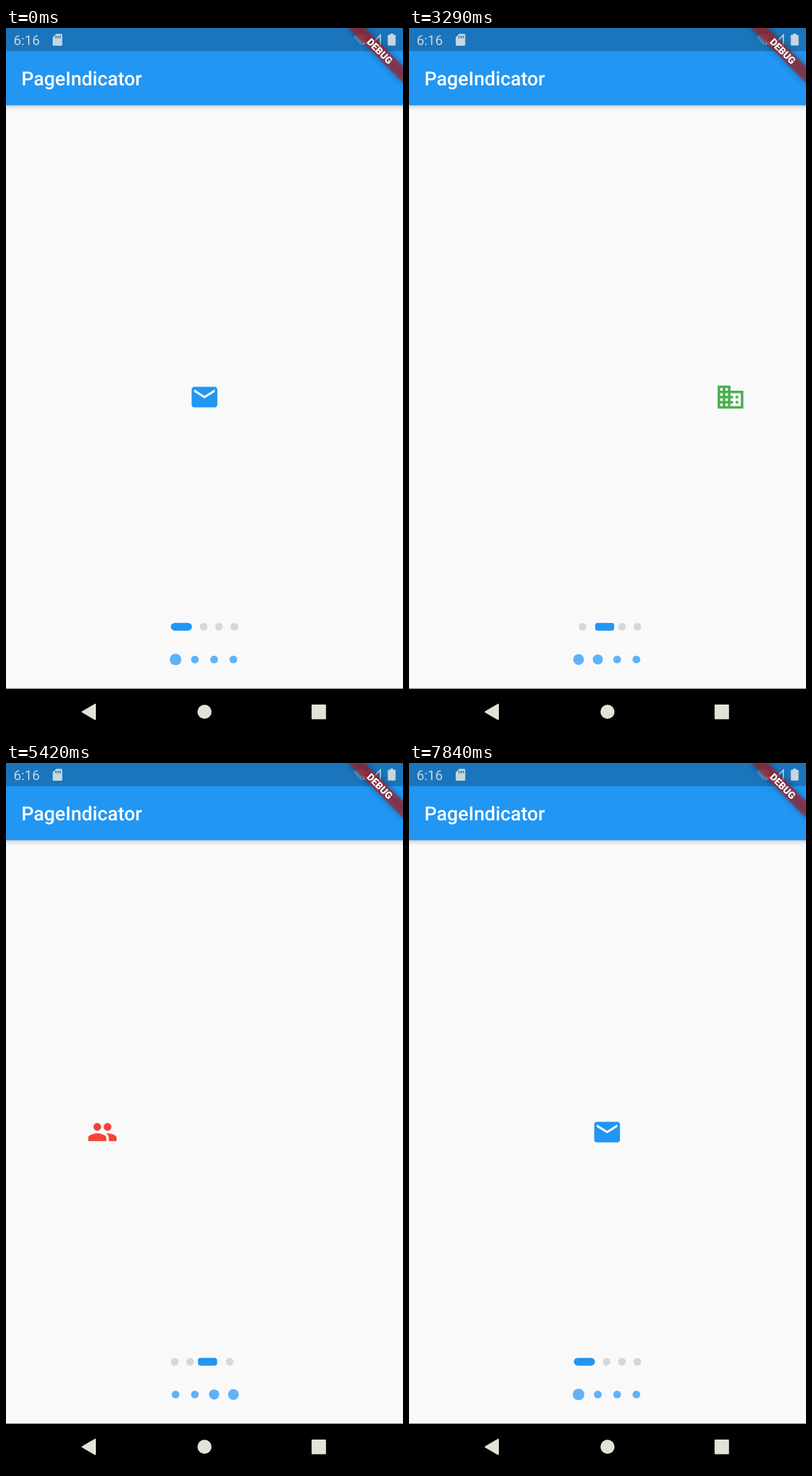
An HTML page for the animation above (7890 ms loop, 561 by 998 pixels).

```html
<!DOCTYPE html>
<html lang="en">
<head>
<meta charset="utf-8">
<title>PageIndicator</title>
<style>
  html, body { margin: 0; width: 100%; height: 100%; overflow: hidden; background: #f9f9fa; }
  svg { display: block; width: 100%; height: 100%; }
  text { font-family: Roboto, sans-serif; text-rendering: geometricPrecision; }
</style>
</head>
<body>
<svg viewBox="0 0 561 998">
  <defs>
    <linearGradient id="shade" x2="0" y2="1">
      <stop stop-color="#000" stop-opacity=".2"/>
      <stop offset=".35" stop-color="#000" stop-opacity=".08"/>
      <stop offset="1" stop-color="#000" stop-opacity="0"/>
    </linearGradient>
    <filter id="blur" x="-20%" y="-100%" width="140%" height="300%"><feGaussianBlur stdDeviation="5"/></filter>
  </defs>
  <rect width="561" height="998" fill="#f9f9fa"/>

  <g id="pages">
    <path fill="#2196f3" d="M20 4H4c-1.1 0-2 .9-2 2v12c0 1.1.9 2 2 2h16c1.1 0 2-.9 2-2V6c0-1.1-.9-2-2-2zm0 4l-8 5-8-5V6l8 5 8-5v2z"/>
    <path fill="#4caf50" d="M12 7V3H2v18h20V7H12zM6 19H4v-2h2v2zm0-4H4v-2h2v2zm0-4H4V9h2v2zm0-4H4V5h2v2zm4 12H8v-2h2v2zm0-4H8v-2h2v2zm0-4H8V9h2v2zm0-4H8V5h2v2zm10 12h-8v-2h2v-2h-2v-2h2v-2h-2V9h8v10zm-2-8h-2v2h2v-2zm0 4h-2v2h2v-2z"/>
    <path fill="#f44336" d="M16 11c1.66 0 3-1.34 3-3s-1.34-3-3-3-3 1.34-3 3 1.34 3 3 3zm-8 0c1.66 0 3-1.34 3-3S9.66 5 8 5 5 6.34 5 8s1.34 3 3 3zm0 2c-2.33 0-7 1.17-7 3.5V19h14v-2.5c0-2.33-4.67-3.5-7-3.5zm8 0c-.29 0-.62.02-.97.05 1.16.84 1.97 1.97 1.97 3.45V19h6v-2.5c0-2.33-4.67-3.5-7-3.5z"/>
    <path fill="#ffeb3b" d="M3.24 6.15C2.51 6.43 2 7.17 2 8v12c0 1.1.89 2 2 2h16c1.11 0 2-.9 2-2V8c0-1.11-.89-2-2-2H8.3l8.26-3.34L15.88 1 3.24 6.15zM7 20c-1.66 0-3-1.34-3-3s1.34-3 3-3 3 1.34 3 3-1.34 3-3 3zm13-8h-2v-2h-2v2H4V8h16v4z"/>
  </g>
  <g id="slots"></g>
  <g id="dots" fill="#60b2f7"></g>

  <!-- app bar -->
  <rect y="109" width="561" height="8" fill="url(#shade)"/>
  <rect width="561" height="109" fill="#2196f3"/>
  <rect width="561" height="32.7" fill="#1a75bc"/>
  <text x="21.8" y="81" font-size="27.27" font-weight="500" fill="#fff">PageIndicator</text>

  <!-- status bar -->
  <g fill="#c9d6dc">
    <text x="10.8" y="24" font-size="19.1">6:16</text>
    <path d="M71 8.2h7a1.5 1.5 0 0 1 1.5 1.5v13.8a1.5 1.5 0 0 1-1.5 1.5H67.5a1.5 1.5 0 0 1-1.5-1.5V13.2z"/>
    <path d="M70.6 11v3.5m3-3.5v3.5m3-3.5v3.5" stroke="#1a75bc" stroke-width="1.5"/>
    <path d="M491 12.5q10-8.5 20 0L501 24.5z" opacity=".3"/>
    <path d="M504 18.5l5 5m0-5l-5 5" stroke="#c9d6dc" stroke-width="1.5"/>
    <path d="M515.5 23.7H529V10z" fill="none" stroke="#c9d6dc" stroke-width="1.7"/>
    <path d="M542.7 8h4.6v1.7h2.2q1 0 1 1v13.1q0 1-1 1h-9q-1 0-1-1V10.7q0-1 1-1h2.2z"/>
  </g>

  <!-- debug banner -->
  <g transform="translate(561 0) rotate(45)">
    <rect x="-54.5" y="38.2" width="109" height="16.4" opacity=".35" filter="url(#blur)"/>
    <rect x="-54.5" y="38.2" width="109" height="16.4" fill="#b71c1c" fill-opacity=".63"/>
    <text y="51.3" font-size="13.9" font-weight="900" fill="#fff" text-anchor="middle">DEBUG</text>
  </g>

  <!-- navigation bar -->
  <rect y="932.6" width="561" height="65.4"/>
  <g fill="#e2e2d9" stroke="#e2e2d9" stroke-linejoin="round" stroke-width="2">
    <path d="M108 965.3L126 954.8V975.8z"/>
    <circle cx="280.5" cy="965.3" r="9"/>
    <rect x="432.8" y="956" width="18.4" height="18.8"/>
  </g>
</svg>
<script>
const LOOP = 7890, W = 561, DOT = 10.9, EXTRA = 19;
// Each swipe: moment it passes the halfway point (s), from, to, speed there (pages/s)
const swipes = [
  [3.206, 0, 1, 1.34], [3.87, 1, 2, 3], [4.535, 2, 3, 3],
  [5.33, 3, 2, 3], [6.104, 2, 1, 7.4], [7.13, 1, 0, 3]
];
const DRAG = 0.22, SWITCH = 0.3, SLOW = 9.07, FAST = 22;

const $ = id => document.getElementById(id);
const set = (el, attrs) => { for (const k in attrs) el.setAttribute(k, attrs[k]); };
const make = (tag, parent) => Array.from({ length: 4 }, () =>
  parent.appendChild(document.createElementNS('http://www.w3.org/2000/svg', tag)));

const icons = [...$('pages').children];
const slots = make('rect', $('slots'));
const dots = make('circle', $('dots'));

// Overdamped spring: distance left after t seconds, starting half a page away
function remaining(t, speed) {
  const a = (FAST * 0.5 - speed) / (FAST - SLOW);
  return a * Math.exp(-SLOW * t) + (0.5 - a) * Math.exp(-FAST * t);
}

function stateAt(t) {
  let pos = 0, prev = 0, cur = 0, s = 1;
  for (const [mid, from, to, speed] of swipes) {
    const dt = t - mid;
    if (dt < -DRAG) break;
    if (dt < 0) {
      const k = Math.max(1, 2 * speed * DRAG);
      pos += ((from + to) / 2 - pos) * (1 + dt / DRAG) ** k;
    } else {
      pos = to - (to - from) * remaining(dt, speed);
      prev = from;
      cur = to;
      s = Math.min(1, dt / SWITCH);
    }
  }
  return { pos, prev, cur, s };
}

function draw(now) {
  const { pos, prev, cur, s } = stateAt((now % LOOP) / 1000);
  const grow = 1 - (1 - s) ** 3, shrink = 1 - s * s * (3 - 2 * s);
  let x = 232.9;
  for (let i = 0; i < 4; i++) {
    const active = i === cur, old = i === prev && !active;
    set(icons[i], { transform: `translate(${W / 2 + (i - pos) * W} 521) scale(1.818) translate(-12 -12)` });

    const room = DOT + EXTRA * (active ? s : old ? 1 - s : 0);
    const w = active ? 21.8 + 8.1 * grow : DOT;
    set(slots[i], {
      x: x + (room - w) / 2, y: 845.2 - DOT / 2, width: w, height: DOT,
      rx: DOT / 2 * (active ? grow : 1), fill: active ? '#2196f3' : '#d7d7d9'
    });
    x += room + DOT;

    const big = active ? grow : old ? shrink : 0;
    set(dots[i], { cx: 239.6 + 27.25 * i, cy: 891.4, r: 5.45 + 2.73 * big });
  }
}

let start;
function tick(now) {
  start ??= now;
  draw(now - start);
  requestAnimationFrame(tick);
}
draw(0);
requestAnimationFrame(tick);
</script>
</body>
</html>
```
